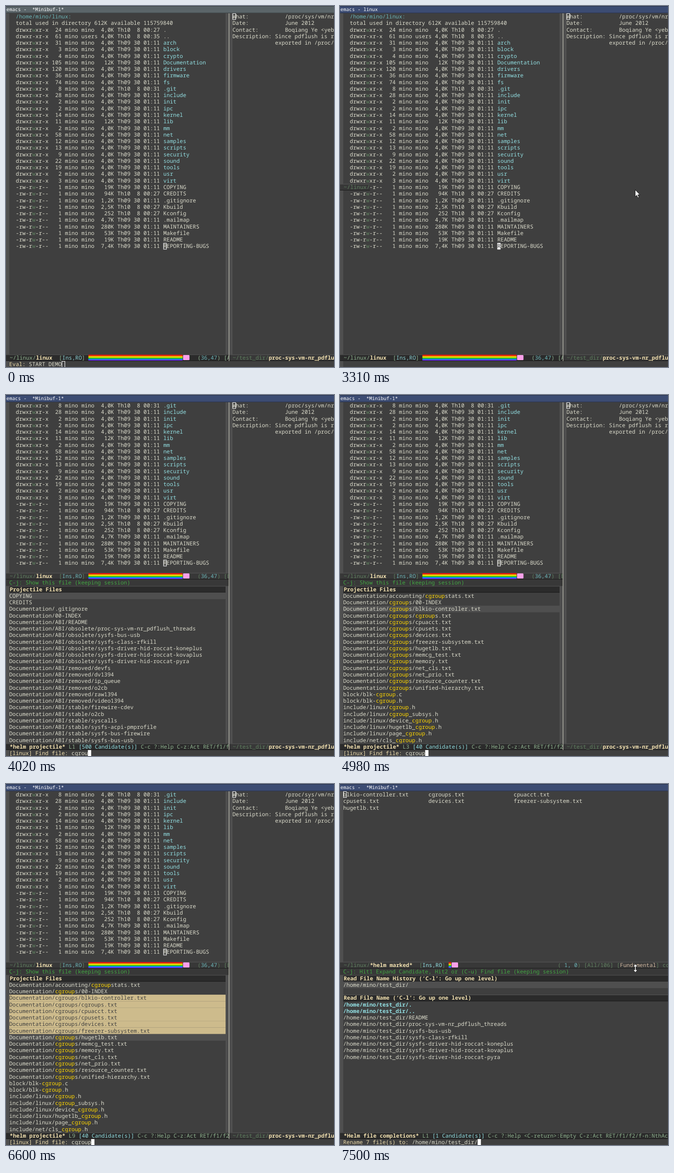
An HTML page for the animation above (8000 ms loop, 714 px wide and 785 px high).

```html
<!DOCTYPE html>
<html lang="en">
<head>
<meta charset="utf-8">
<title>Editor session</title>
<style>
  html, body { margin: 0; width: 100%; height: 100%; overflow: hidden; background: #3f3f3f; }
  svg { display: block; }
  text {
    font-family: "Noto Sans Mono", "DejaVu Sans Mono", monospace;
    font-size: 11.893px; white-space: pre; text-rendering: geometricPrecision;
  }
  .title { font-size: 10.43px; }
</style>
</head>
<body>
<svg id="stage" width="714" height="785" viewBox="0 0 714 785"></svg>
<script>
const W = 714, H = 785, LOOP = 8000;
const CW = 7.136, RH = 14.268, TOP = 15.8, LEFT = 7, SPLIT = 486;
const MODE_ROW = 52, MINI_ROW = 53, MID_ROW = 26, LIST_ROW = 29;
const C = {
  bg: '#3f3f3f', fringe: '#4f4f4f', fg: '#dcdccc', dark: '#2b2b2b', idle: '#383838',
  cyan: '#93e0e3', teal: '#6cb5b8', dim: '#5f7f5f', green: '#8fb28f', lime: '#43a543',
  cream: '#f0dfaf', gold: '#ffd700', mark: '#cdbb8c', white: '#ffffff'
};
const USER = 'mino', HOME = `/home/${USER}/`;

// name, links, size and, for recent entries, the time
const entries = `. 24 4,0K 00:27
.. 61 4,0K 00:35
arch 31 4,0K
block 3 4,0K
crypto 4 4,0K
Documentation 105 12K
drivers 120 4,0K
firmware 36 4,0K
fs 74 4,0K
.git 8 4,0K 00:31
include 28 4,0K
init 2 4,0K
ipc 2 4,0K
kernel 14 4,0K
lib 11 12K
mm 2 4,0K
net 58 4,0K
samples 12 4,0K
scripts 13 4,0K
security 9 4,0K
sound 22 4,0K
tools 19 4,0K
usr 2 4,0K
virt 3 4,0K
COPYING 1 19K
CREDITS 1 94K 00:27
.gitignore 1 1,2K
Kbuild 1 2,5K 00:27
Kconfig 1 252 00:27
.mailmap 1 4,7K
MAINTAINERS 1 280K
Makefile 1 53K
README 1 19K
REPORTING-BUGS 1 7,4K`.split('\n').map(line => line.split(' '));
const DIRS = 24;

const under = (dir, names) => names.split(' ').map(n => dir + n);
const obsolete = 'sysfs-driver-hid-roccat-';
const allFiles = [
  'COPYING', 'CREDITS',
  ...under('Documentation/', '.gitignore 00-INDEX ABI/README'),
  ...under('Documentation/ABI/obsolete/', `proc-sys-vm-nr_pdflush_threads sysfs-bus-usb sysfs-class-rfkill ${obsolete}koneplus ${obsolete}kovaplus ${obsolete}pyra`),
  ...under('Documentation/ABI/removed/', 'devfs dv1394 ip_queue o2cb raw1394 video1394'),
  ...under('Documentation/ABI/stable/', 'firewire-cdev o2cb syscalls sysfs-acpi-pmprofile sysfs-bus-firewire sysfs-bus-usb')
];
const matches = [
  'Documentation/accounting/cgroupstats.txt',
  ...under('Documentation/cgroups/', '00-INDEX blkio-controller.txt cgroups.txt cpuacct.txt cpusets.txt devices.txt freezer-subsystem.txt hugetlb.txt memcg_test.txt memory.txt net_cls.txt net_prio.txt resource_counter.txt unified-hierarchy.txt'),
  ...under('block/blk-cgroup.', 'c h'),
  ...under('include/linux/', 'cgroup.h cgroup_subsys.h device_cgroup.h hugetlb_cgroup.h page_cgroup.h'),
  'include/net/cls_cgroup.h'
];

const rowY = row => TOP + row * RH;
const colX = col => LEFT + col * CW;
const esc = s => s.replace(/&/g, '&amp;').replace(/</g, '&lt;');

function rect(x, y, w, h, fill, extra = '') {
  return `<rect x="${x}" y="${y}" width="${w}" height="${h}" fill="${fill}" ${extra}/>`;
}

// parts: [string, colour, bold] laid out one after another
function line(x, row, ...parts) {
  let out = '';
  for (const [str, fill = C.fg, bold] of parts) {
    if (str.trim()) out += `<text x="${x}" y="${rowY(row) + 11.2}" fill="${fill}"${bold ? ' font-weight="700"' : ''}>${esc(str)}</text>`;
    x += str.length * CW;
  }
  return out;
}

function clip(width, body) {
  return `<svg x="0" y="0" width="${width}" height="${H}" overflow="hidden">${body}</svg>`;
}

function hollow(x, row) {
  return rect(x + .6, rowY(row) + .6, CW - .8, RH - 1.2, 'none', `stroke="${C.white}" stroke-width="1.1"`);
}

function solid(x, row, char = '') {
  return rect(x, rowY(row), CW, RH, C.white) + line(x, row, [char, C.bg]);
}

function raised(x, row, w, fill) {
  const y = rowY(row);
  return rect(x, y, w, RH, fill) + rect(x, y, w, 1, '#5a5a5a') + rect(x, y + RH - 1, w, 1, '#181818');
}

function rainbow(x, row, w) {
  const colors = ['#ff0000', '#ff9900', '#ffff00', '#33cc00', '#0099ff', '#6633ff'];
  const y = rowY(row) + .7, band = 2.1;
  return colors.map((c, i) => rect(x, y + i * band, w, band, c)).join('') +
    rect(x + w + 1, y + .5, 14, 11, '#fba0ea', 'rx="1.5"');
}

function title(s) {
  return rect(0, 0, W, 15.5, s.focus ? '#3c4c73' : '#5b6569') +
    rect(0, 0, W, 1, '#000', 'opacity=".4"') + rect(0, 14.5, W, 1, '#000', 'opacity=".35"') +
    `<text class="title" x="1" y="11.3" fill="#fff">emacs - ${s.title}</text>`;
}

function permissions(x, row, perm) {
  return line(x, row, [perm.slice(0, 5)], [perm[5], perm[5] === 'w' ? C.dim : C.fg], [perm.slice(6)]);
}

function dired(s) {
  const first = s.helm ? 11 : 0, rows = s.helm ? MID_ROW : MODE_ROW;
  let out = '';
  if (!first) {
    out += line(colX(2), 0, [`${HOME}linux:`, C.teal]);
    out += line(colX(2), 1, ['total used in directory 612K available 115759840']);
  }
  entries.forEach(([name, links, size, time], i) => {
    const row = i + 2 - first;
    if (row < 0 || row >= rows) return;
    const isDir = i < DIRS;
    const perm = name === '..' ? 'drwxr-xr-x' : isDir ? 'drwxrwxr-x' : '-rw-rw-r--';
    const group = name === '..' ? 'users' : USER;
    const date = time ? `Th10  8 ${time}` : 'Th09 30 01:11';
    out += permissions(colX(2), row, perm);
    out += line(colX(13), row, [`${links.padStart(3)} ${USER} ${group.padEnd(5)} ${size.padStart(4)} ${date}`]);
    out += line(colX(47), row, [name, isDir && i > 1 ? C.cyan : C.fg]);
  });
  const cursorRow = entries.length + 1 - first;
  out += s.title === 'linux' ? solid(colX(47), cursorRow, 'R') : hollow(colX(47), cursorRow);
  return out;
}

function diredMode(row, active) {
  const soft = active ? C.green : C.dim, hue = active ? '#8cd0d3' : C.teal;
  return raised(0, row, SPLIT, active ? C.dark : C.idle) +
    line(8.1, row, ['~/linux/', soft], ['linux', C.cream, true], ['  [', soft], ['Ins,RO', hue], [']', soft]) +
    rainbow(179.4, row, 205) +
    line(417, row, ['(', soft], ['36,47', C.teal], [') [', soft], [active ? 'All' : 'Bot', soft]);
}

function helmMode(name, lineNo, count, help, width) {
  return raised(0, MODE_ROW, width, C.dark) +
    line(8.1, MODE_ROW, [name, C.cream, true], [` L${lineNo} `, C.green],
      [`[${count} Candidate(s)] `, C.cyan], [help, C.green]);
}

function helmHeader(text, width) {
  return rect(0, rowY(27), width, RH, C.idle) + line(LEFT, 27, [text, C.lime]);
}

function sourceHeader(row, text, right) {
  return raised(LEFT, row, right - LEFT, C.dark) + line(colX(0) + 1, row, [text, C.cream, true]);
}

function helmFiles(s) {
  let out = helmHeader('C-j: Show this file (keeping session)', SPLIT - 1) + sourceHeader(28, 'Projectile Files', 478);
  (s.filtered ? matches : allFiles).forEach((file, i) => {
    const row = LIST_ROW + i, marked = i >= 2 && i < 2 + s.marked;
    if (marked || i === s.cur) out += rect(LEFT, rowY(row), 471, RH + .1, marked ? C.mark : C.fringe);
    const parts = s.filtered && !marked ? file.split(/(cgroup)/) : [file];
    out += line(LEFT, row, ...parts.map(p => [p, marked ? C.bg : p === 'cgroup' ? C.gold : C.fg]));
  });
  return out + helmMode('*helm projectile*', s.cur + 1, s.count, 'C-c ?:Help C-z:Act RET/f1/f2/f-n:NthAct', SPLIT);
}

function rightPane() {
  const x = 493, put = (col, row, str) => line(x + col * CW, row, [str]);
  return rect(SPLIT, rowY(0), LEFT, rowY(MODE_ROW) - TOP, C.fringe) +
    put(0, 0, 'What:') + put(16, 0, '/proc/sys/vm/nr_pdflush_threads') +
    put(0, 1, 'Date:') + put(16, 1, 'June 2012') +
    put(0, 2, 'Contact:') + put(16, 2, 'Boqiang Ye <yeb') +
    put(0, 3, 'Description: Since pdflush is replaced') + put(13, 4, 'exported in /proc/sys') +
    hollow(x, 0) + raised(SPLIT, MODE_ROW, W - SPLIT, C.idle) +
    line(493.5, MODE_ROW, ['~/test_dir/', C.dim], ['proc-sys-vm-nr_pdflush_threads', C.cream, true]) +
    rect(SPLIT - 1, rowY(0), 1, rowY(MINI_ROW) - TOP, C.fg);
}

function splitView(s) {
  let left = rect(478, rowY(0), 7, rowY(MODE_ROW) - TOP, C.fringe) + dired(s);
  if (s.partial) left += raised(0, MID_ROW, 65.2, C.idle) + line(8.1, MID_ROW, ['~/linux/', C.dim]);
  left += s.helm ? diredMode(MID_ROW, false) + helmFiles(s) : diredMode(MODE_ROW, true);
  return clip(SPLIT, left) + rightPane();
}

function markedView() {
  const files = matches.slice(2, 9).map(f => f.split('/').pop());
  return files.map((f, i) => line(colX(i % 3 * 26), Math.floor(i / 3), [f])).join('') + hollow(LEFT, 0) +
    raised(0, MID_ROW, W, C.idle) +
    line(8.1, MID_ROW, ['~/linux/', C.dim], ['*helm marked*', C.cream, true], ['  [', C.dim], ['Ins,RO', C.cyan], [']', C.dim]) +
    rainbow(236.5, MID_ROW, 5.5) +
    line(474, MID_ROW, ['( ', C.dim], ['1, 0', C.teal], [') [All/106] [', C.dim], ['Fundamental', '#d0b8a0'], ['] company', C.dim]);
}

function renameList() {
  const dir = `${HOME}test_dir/`;
  const files = ['.', '..', 'README', ...allFiles.slice(5, 11).map(f => f.split('/').pop())];
  return helmHeader('C-j: Hit1 Expand Candidate, Hit2 or (C-u) Find file (keeping session)', W) +
    sourceHeader(28, 'Read File Name History (‘C-l’: Go up one level)', W) +
    rect(LEFT, rowY(29), W, RH, C.fringe) + line(LEFT, 29, [dir]) +
    sourceHeader(31, 'Read File Name (‘C-l’: Go up one level)', W) +
    files.map((f, i) => line(LEFT, 32 + i, [dir + f, i < 2 ? C.cyan : C.fg, i < 2])).join('') +
    helmMode('*Helm file completions*', 1, 1, 'C-c ?:Help <C-return>:Empty C-z:Act RET/f1/f2/f-n:NthAct', W);
}

function minibuffer(s) {
  const full = s.prompt + s.input, x = colX(full.length);
  return rect(0, rowY(MINI_ROW), W, H, C.bg) + rect(0, rowY(MINI_ROW), LEFT, H, C.fringe) +
    line(LEFT, MINI_ROW, [s.prompt, C.cream], [s.input]) +
    (s.title === 'linux' ? '' : s.caret ? solid(x, MINI_ROW) : hollow(x, MINI_ROW));
}

const pointers = {
  none: '',
  arrow: '<path d="M642.6 399.6v15.2l3.4-3.2 2.5 5.6 2.4-1.1-2.5-5.5h4.6z" fill="#fff" stroke="#111" stroke-width="1"/>',
  resize: '<path d="M643 391.5l5 5.6h-3.7v7h3.7l-5 5.6-5-5.6h3.7v-7h-3.7z" fill="#fff" stroke="#111" stroke-width="1"/>'
};

// each step changes part of the state from its time on
const MINI = ' *Minibuf-1*';
const steps = [
  [0, { title: MINI, focus: false, caret: false, prompt: 'Eval: ', input: 'START DEMO', pointer: 'none',
        helm: false, partial: false, filtered: false, cur: 0, marked: 0, count: 500, view: 'split' }],
  [420, { focus: true, pointer: 'arrow' }],
  [480, { caret: true }],
  [1580, { title: 'linux', prompt: '', input: '' }],
  [1620, { input: 'Quit' }],
  [1880, { input: '' }],
  [3310, { partial: true }],
  [3350, { partial: false, helm: true, title: MINI, prompt: '[linux] Find file: ' }],
  [3560, { pointer: 'none' }],
  ...[3660, 3710, 3750, 3950, 4020, 4090].map((t, i) => [t, { input: 'cgroup'.slice(0, i + 1) }]),
  [4160, { filtered: true }],
  [4820, { cur: 1, count: 40 }],
  [4980, { cur: 2 }],
  ...[5830, 5990, 6150, 6310, 6460, 6600, 6710].map((t, i) => [t, { marked: i + 1, cur: i + 3 }]),
  [6990, { cur: 8 }],
  [7420, { view: 'marked', prompt: 'Rename 7 file(s) to: ', input: `${HOME}test_dir/` }],
  [7460, { view: 'rename' }],
  [7500, { pointer: 'resize' }]
];

function draw(s) {
  const body = s.view === 'split' ? splitView(s) : markedView() + (s.view === 'rename' ? renameList() : '');
  return rect(0, 0, W, H, C.bg) + rect(0, rowY(0), LEFT, rowY(MODE_ROW) - TOP, C.fringe) +
    body + minibuffer(s) + title(s) + pointers[s.pointer];
}

const stage = document.getElementById('stage');
let shown = -1;

function update(time) {
  const t = time % LOOP;
  const count = steps.filter(([at]) => at <= t).length;
  if (count === shown) return;
  shown = count;
  stage.innerHTML = draw(Object.assign({}, ...steps.slice(0, count).map(([, patch]) => patch)));
}

const start = performance.now();
function tick() {
  update(performance.now() - start);
  requestAnimationFrame(tick);
}
tick();
</script>
</body>
</html>
```
